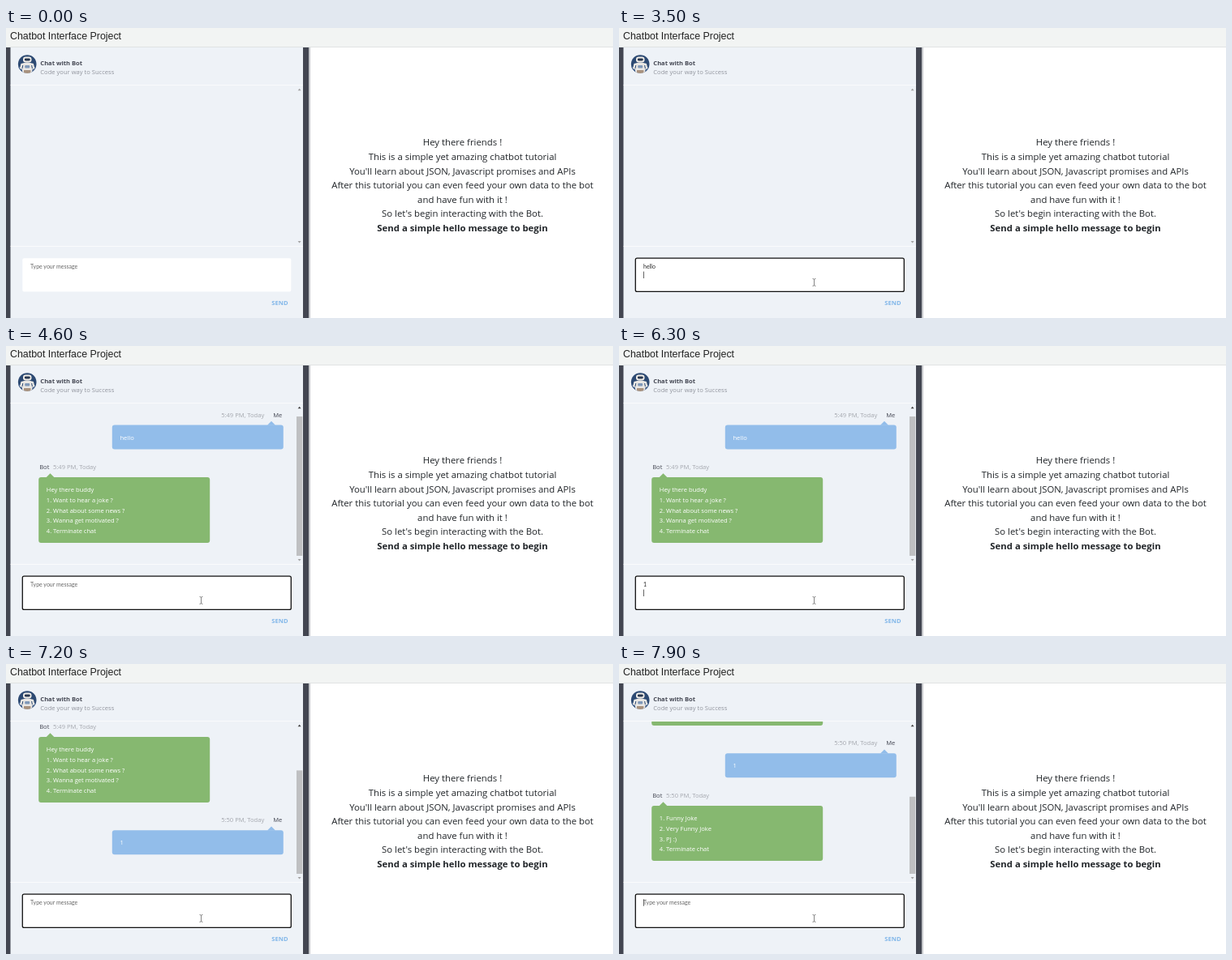
An HTML page for the animation above (8 s loop, 748 by 358 pixels).

```html
<!DOCTYPE html>
<html lang="en">
<head>
<meta charset="utf-8">
<title>Chatbot Interface Project</title>
<style>
  html, body { margin: 0; width: 100%; height: 100%; overflow: hidden; background: #fff; }
  svg { display: block; width: 100%; height: 100%; }
  text { white-space: pre; }
  .chat { font: 7.58px "Open Sans", "Noto Sans", sans-serif; fill: #fff; }
  .chat .name, .bold { fill: #444753; }
  .chat .time { fill: #a4a7ae; }
  .bold { font-weight: 700; }
  .intro { font: 11.36px "Open Sans", "Noto Sans", sans-serif; fill: #212529; text-anchor: middle; }
  .input { font: 7px Lato, "Open Sans", sans-serif; }
</style>
</head>
<body>
<svg id="stage" viewBox="0 0 748 358" xmlns="http://www.w3.org/2000/svg">
  <defs>
    <clipPath id="view"><rect x="5" y="71" width="352" height="198"/></clipPath>
    <clipPath id="face"><circle cx="26.2" cy="44.6" r="11.3"/></clipPath>
  </defs>

  <rect width="748" height="358" fill="#fff"/>
  <rect width="748" height="23" fill="#f2f4f3"/>
  <rect y="23" width="748" height="1" fill="#e0e3e3"/>
  <text x="5" y="14" font-family="Liberation Sans, Arial, sans-serif" font-size="12.4" fill="#222">Chatbot Interface Project</text>

  <rect y="24" width="373" height="334" fill="#434651"/>
  <rect x="373" y="24" width="2" height="334" fill="#c4c6ca"/>
  <rect x="5.5" y="24" width="360.5" height="334" fill="#eef2f7"/>

  <g clip-path="url(#face)">
    <rect x="14" y="33" width="25" height="24" fill="#2d4a73"/>
    <path d="M14 48h6v9h-6zM32.5 48h6v9h-6z" fill="#46648f"/>
    <rect x="21" y="35.5" width="10.5" height="7" rx="3.2" fill="#f0ede8"/>
    <rect x="22.8" y="37.6" width="7" height="2.8" rx="1.4" fill="#27364f"/>
    <path d="M18.5 44q7.7-3 15.4 0l1.6 6-3 1-.5 6H20.4l-.5-6-3-1z" fill="#e9e7e4"/>
    <path d="M20.8 46l-.8 4M31.6 46l.8 4" stroke="#2d4a73" fill="none"/>
    <rect x="23.2" y="46" width="6" height="3.6" rx="1" fill="#7f98b8"/>
    <path d="M22 52h8.4v5H22z" fill="#a8927f"/>
  </g>
  <g class="chat">
    <text class="bold" x="42.3" y="46">Chat with Bot</text>
    <text class="time" x="42.3" y="57.4" style="fill:#92959e">Code your way to Success</text>
  </g>
  <path d="M5.5 70.5H366M5.5 269.5H366" stroke="#fff" stroke-opacity=".7"/>

  <g clip-path="url(#view)"><g id="log" class="chat"></g></g>

  <rect id="thumb" x="358" width="7.3" fill="#bfc0c2"/>
  <path id="up" d="M359.6 77.2h4l-2-2.4z"/>
  <path d="M359.6 263h4l-2 2.4z" fill="#a3a3a3"/>

  <rect id="box" x="20.3" y="284.2" width="331" height="41.2" rx="2" fill="#fff" stroke-width="1.3"/>
  <text id="draft" class="input" x="30" y="296.8"></text>
  <rect id="caret" width=".7" height="8.4" fill="#222"/>
  <path id="mouse" d="M238.6 309.5q1.9 0 1.9 1.2 0-1.2 1.9-1.2M240.5 310.7v6.6M238.6 318.5q1.9 0 1.9-1.2 0 1.2 1.9 1.2" fill="none" stroke="#666" stroke-width=".8"/>
  <text class="chat bold" x="327.3" y="342" style="fill:#80b6e9">SEND</text>
  <g id="intro" class="intro"></g>
</svg>
<script>
const LOOP = 8000;
const VIEW = 200, TRACK_TOP = 81, TRACK_END = 259;
const $ = id => document.getElementById(id);

function add(parent, tag, attrs, content) {
  const node = document.createElementNS("http://www.w3.org/2000/svg", tag);
  for (const key in attrs) node.setAttribute(key, attrs[key]);
  if (content) node.textContent = content;
  return parent.appendChild(node);
}

const intro = [
  "Hey there friends !",
  "This is a simple yet amazing chatbot tutorial",
  "You'll learn about JSON, Javascript promises and APIs",
  "After this tutorial you can even feed your own data to the bot",
  "and have fun with it !",
  "So let's begin interacting with the Bot.",
  "Send a simple hello message to begin"
];
intro.forEach((line, i) => add($("intro"), "text",
  { x: 562.5, y: 145.3 + 17.6 * i, "font-weight": i === 6 ? 700 : 400 }, line));

// y is the top of the bubble in the unscrolled log
const messages = [
  { at: 3600, me: true, y: 104.5, h: 30, time: "5:49 PM, Today", lines: ["hello"] },
  { at: 4500, y: 169, h: 81, time: "5:49 PM, Today", lines: ["Hey there buddy",
    "1. Want to hear a joke ?", "2. What about some news ?", "3. Wanna get motivated ?", "4. Terminate chat"] },
  { at: 6400, me: true, y: 284.2, h: 30, time: "5:50 PM, Today", lines: ["1"] },
  { at: 7400, y: 349, h: 68, time: "5:50 PM, Today", lines: ["1. Funny Joke",
    "2. Very Funny Joke", "3. PJ :)", "4. Terminate chat"] }
];
for (const m of messages) {
  const g = m.node = add($("log"), "g", {});
  const x = m.me ? 130.8 : 40.2, tip = m.me ? 327 : 54.5;
  const fill = m.me ? "#92bdea" : "#86b870";
  const base = m.y - 10;
  if (m.me) {
    add(g, "text", { class: "time", x: 318.3, y: base, "text-anchor": "end" }, m.time);
    add(g, "text", { class: "name", x: 340.3, y: base, "text-anchor": "end" }, "Me");
  } else {
    add(g, "text", { class: "name", x: 41.2, y: base }, "Bot");
    add(g, "text", { class: "time", x: 58, y: base }, m.time);
  }
  add(g, "path", { d: `M${tip - 5} ${m.y + .2}l5-5 5 5z`, fill });
  add(g, "rect", { x, y: m.y, width: 211, height: m.h, rx: 3, fill });
  m.lines.forEach((line, i) => add(g, "text", { x: x + 9.6, y: m.y + 18.1 + 12.75 * i }, line));
}

// Step tables: [start time, value]
const drafts = [[0, ""], [1800, "h"], [2100, "he"], [2700, "hel"], [2900, "hell"], [3100, "hello"],
  [3500, "hello\n"], [3600, ""], [5800, "1"], [6300, "1\n"], [6400, ""]];
const carets = [[0, 0], [900, 1], [1400, 0], [1800, 1], [2600, 0], [2700, 1], [4100, 0],
  [4700, 1], [5200, 0], [5700, 1], [7000, 0], [7500, 1]];
const scrolls = [[0, 0], [4500, 7], [6400, 79], [7400, 174]];
const at = (steps, t) => steps.filter(s => s[0] <= t).pop()[1];
const show = (node, on) => node.setAttribute("visibility", on ? "visible" : "hidden");

function render(t) {
  for (const m of messages) show(m.node, t >= m.at);

  const scroll = at(scrolls, t);
  const size = (TRACK_END - TRACK_TOP) * VIEW / (VIEW + scroll);
  $("log").setAttribute("transform", `translate(0 ${-scroll})`);
  $("thumb").setAttribute("y", TRACK_END - size);
  $("thumb").setAttribute("height", size);
  show($("thumb"), scroll > 0);
  $("up").setAttribute("fill", scroll ? "#444" : "#a3a3a3");

  $("box").setAttribute("stroke", t >= 900 ? "#111" : "none");
  show($("mouse"), t >= 800);

  const text = at(drafts, t), broken = text.endsWith("\n");
  const draft = $("draft"), caret = $("caret");
  draft.textContent = text.trim() || "Type your message";
  draft.setAttribute("fill", text ? "#222" : "#666");
  const shift = text && !broken ? draft.getComputedTextLength() : 0;
  caret.setAttribute("x", 30.1 + shift);
  caret.setAttribute("y", broken ? 300.6 : 290.4);
  show(caret, at(carets, t));
}

const start = performance.now();
function tick() {
  render((performance.now() - start) % LOOP);
  requestAnimationFrame(tick);
}
tick();
</script>
</body>
</html>
```
